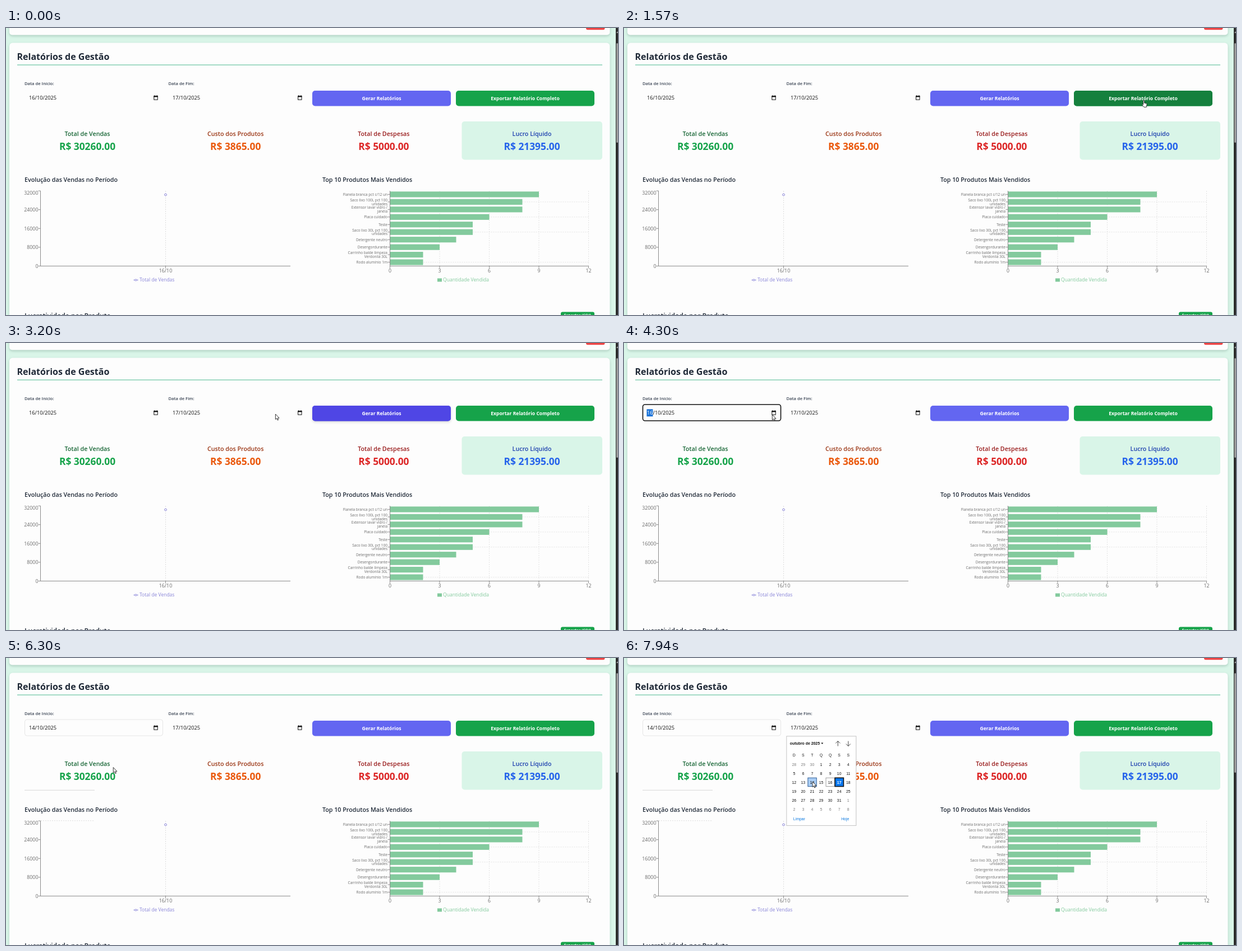
Write an HTML page that moves like this. It is 1091 px wide and 513 px high and loops after 8000 ms.

```html
<!DOCTYPE html>
<html lang="pt-BR">
<head>
<meta charset="utf-8">
<title>Relatórios de Gestão</title>
<style>
  html, body { margin: 0; width: 100%; height: 100%; overflow: hidden; background: #d9f5e8; }
  svg { display: block; width: 1091px; height: 513px; font-family: "Open Sans", "Noto Sans", sans-serif; }
  .card { fill: #fdfdfd; filter: drop-shadow(0 2px 2px rgba(20, 70, 50, .22)); }
  .cal { font-family: "Liberation Sans", Arial, sans-serif; }
</style>
</head>
<body>
<svg id="stage" viewBox="0 0 1091 513" xmlns="http://www.w3.org/2000/svg"></svg>
<script>
const NS = 'http://www.w3.org/2000/svg';
const LOOP = 8000;
const stage = document.getElementById('stage');

function el(tag, attrs, parent = stage) {
  const node = document.createElementNS(NS, tag);
  for (const k in attrs) node.setAttribute(k, attrs[k]);
  parent.appendChild(node);
  return node;
}
const rect = (x, y, width, height, fill, more = {}, parent) =>
  el('rect', { x, y, width, height, fill, ...more }, parent);
const line = (x1, y1, x2, y2, stroke, more = {}, parent) =>
  el('line', { x1, y1, x2, y2, stroke, ...more }, parent);
function text(str, x, y, size, fill, weight = 400, anchor = 'start', parent) {
  const node = el('text', { x, y, 'font-size': size, fill, 'font-weight': weight, 'text-anchor': anchor }, parent);
  node.textContent = str;
  return node;
}
const show = (node, on) => node.setAttribute('visibility', on ? 'visible' : 'hidden');

const INK = '#1f2937', AXIS = '#8c8c8c', LABEL = '#6b6b6b';
const dash = { 'stroke-dasharray': '2 2', 'stroke-width': .8 };

// Page and cards
rect(0, 0, 1091, 513, '#d9f5e8');
rect(6, -20, 1070.5, 32.5, '#fdfdfd', { rx: 5, class: 'card' });
rect(1034, -10, 33.5, 13.2, '#ef4444', { rx: 3 });
rect(6, 26.5, 1070.5, 520, '#fdfdfd', { rx: 6, class: 'card' });
rect(1087, 0, 4, 513, '#2b2b2b');
rect(1088, 27, 3, 178, '#9c9c9c', { rx: 1.5 });
el('path', { d: 'M1088 9l2-3 2 3z', fill: '#9c9c9c' });

text('Relatórios de Gestão', 19.5, 57, 16, INK, 700);
line(20, 66, 1063, 66, '#86cfb5', { 'stroke-width': 1.3 });

// Date fields
text('Data de Início:', 33, 102.3, 7.65, '#374151', 600);
text('Data de Fim:', 289.5, 102.3, 7.65, '#374151', 600);

const field = rect(33.5, 110, 246, 29, '#fdfdfd', { rx: 4 });
const daySelection = rect(40.5, 118.3, 11, 13, '#1a73d9');

function dateText(x, day) {
  const node = text('', x, 128.2, 9.25, '#111');
  const first = el('tspan', {}, node);
  first.textContent = day;
  el('tspan', {}, node).textContent = '/10/2025';
  return first;
}
const startDay = dateText(41, '16');
dateText(297, '17');

for (const x of [263.3, 520.1]) {
  rect(x + .5, 121.8, 6.4, 6.4, 'none', { stroke: '#111' });
  rect(x, 121.2, 7.4, 2.2, '#111');
  rect(x + 1, 120.3, 1, 1.5, '#111');
  rect(x + 5.4, 120.3, 1, 1.5, '#111');
}

// Buttons
function button(x, label, base, hover) {
  rect(x, 112, 247, 27.5, base, { rx: 5 });
  const over = rect(x, 112, 247, 27.5, hover, { rx: 5, opacity: 0 });
  text(label, x + 123.5, 129, 8.6, '#fff', 700, 'middle');
  return over;
}
const runHover = button(546, 'Gerar Relatórios', '#6366f1', '#4f46e5');
runHover.style.filter = 'drop-shadow(0 2px 2px rgba(0,0,0,.15))';
const exportHover = button(802, 'Exportar Relatório Completo', '#16a34a', '#15803d');

// Totals
rect(812.5, 167, 250.5, 68.5, '#d9f5e8', { rx: 5 });
[
  ['Total de Vendas', 'R$ 30260.00', '#166534', '#16a34a'],
  ['Custo dos Produtos', 'R$ 3865.00', '#9a3412', '#ea580c'],
  ['Total de Despesas', 'R$ 5000.00', '#991b1b', '#dc2626'],
  ['Lucro Líquido', 'R$ 21395.00', '#1e40af', '#2563eb']
].forEach(([name, sum, dark, bright], i) => {
  const x = 145 + i * 264.2;
  text(name, x, 193, 10.7, dark, 600, 'middle');
  text(sum, x, 218.3, 17.35, bright, 700, 'middle');
});

// Sales line chart
text('Evolução das Vendas no Período', 33, 275.2, 10.7, INK, 600);
line(284.5, 291, 284.5, 425, '#d4d4d4', dash);
line(61.5, 291, 61.5, 426, AXIS);
line(61.5, 425.5, 507, 425.5, AXIS);
line(284.5, 425.5, 284.5, 429.5, AXIS);
for (let i = 0; i < 5; i++) {
  const y = 425.5 - i * 33.6;
  line(57.5, y, 61.5, y, AXIS);
  text(i * 8000, 57.5, i === 4 ? 298.4 : y + 3.3, 8.9, LABEL, 400, 'end');
}
text('16/10', 284.5, 436.6, 8.8, LABEL, 400, 'middle');
el('circle', { cx: 284.5, cy: 298, r: 1.9, fill: '#fff', stroke: '#8884d8' });
line(227.5, 450.5, 235.5, 450.5, '#8884d8', { 'stroke-width': 1.2 });
el('circle', { cx: 231.5, cy: 450.5, r: 1.5, fill: '#fff', stroke: '#8884d8' });
text('Total de Vendas', 238, 453.3, 8.5, '#8884d8');

// Top products bar chart
text('Top 10 Produtos Mais Vendidos', 564, 275.2, 10.7, INK, 600);
const products = [
  ['Flanela branca pct c/12 un', 9], ['Saco lixo 100L pct 100|unidades', 8],
  ['Extensor lavar vidro /|janela', 8], ['Placa cuidado', 6], ['Teste', 5],
  ['Saco lixo 30L pct 100|unidades', 5], ['Detergente neutro', 4], ['Desengordurante', 3],
  ['Carrinho balde limpeza|Verdonila 30L', 2], ['Rodo alumínio 1m', 2]
];
const UNIT = 29.5, X0 = 684.5;
for (let n = 0; n <= 12; n += 3) {
  const x = X0 + n * UNIT;
  if (n) line(x, 291, x, 425, '#dcdcdc', dash);
  line(x, 425.5, x, 429.5, AXIS);
  text(n, x, 436.6, 8.8, LABEL, 400, 'middle');
}
products.forEach(([name, count], i) => {
  const y = 297.4 + i * 13.47;
  if ([1, 3, 5, 9].includes(i)) line(X0, y, 1038.5, y, '#dcdcdc', dash);
  rect(X0, y - 5.1, count * UNIT, 10.2, '#83ca9d');
  line(X0 - 4, y, X0, y, AXIS);
  const rows = name.split('|');
  rows.forEach((row, k) =>
    text(row, 680, y + 2.3 + (k - (rows.length - 1) / 2) * 6.8, 6.5, LABEL, 400, 'end'));
});
line(X0, 291, X0, 426, AXIS);
line(X0, 425.5, 1038.5, 425.5, AXIS);
rect(769, 447.5, 8, 6, '#83ca9d');
text('Quantidade Vendida', 779, 453.3, 8.6, '#83ca9d');

// Next section, cut by the lower edge
text('Lucratividade por Produto', 33, 518.6, 12.2, INK, 600);
rect(989, 507.5, 60, 18, '#16a34a', { rx: 3 });
text('Exportar (CSV)', 1019, 516, 6.8, '#fff', 700, 'middle');

// Edges left where the first calendar has been
const edges = el('g', {});
line(33, 236.3, 158, 236.3, '#dedede', { 'stroke-width': 1.2 }, edges);
line(62, 290.8, 157, 290.8, '#d4d4d4', dash, edges);

// Calendar popups
function calendar(x0, selected, today) {
  const g = el('g', { class: 'cal' });
  const put = (s, x, y, fill, weight, anchor) => text(s, x0 + x, y, 6.9, fill, weight, anchor, g);
  const cell = (i, fill, stroke, width) =>
    rect(x0 + 6.4 + (i % 7) * 16.07, 214.2 + (Math.floor(i / 7) - 2) * 16, 15.4, 15.4, fill,
      { stroke, 'stroke-width': width }, g);
  rect(x0 + .5, 139.8, 124, 159.7, '#fff', { stroke: '#c4c4c4' }, g);
  put('outubro de 2025', 6.5, 155, '#111', 700);
  el('path', { d: `M${x0 + 62} 151.6h4l-2 2.4z`, fill: '#111' }, g);
  el('path', {
    d: `M${x0 + 92} 157.5v-9m-4 4l4-4 4 4M${x0 + 110.5} 148.5v9m-4-4l4 4 4-4`,
    fill: 'none', stroke: '#333', 'stroke-width': .9
  }, g);
  const hover = cell(0, '#a9cdf5', '#2f5f98', 1);
  if (today) cell(today + 2, 'none', '#8a8a8a', .8);
  cell(selected + 2, '#0a78f0', '#111', 1.5);
  [...'DSTQQSS'].forEach((d, i) => put(d, 14 + i * 16.07, 176, '#222', 400, 'middle'));
  for (let i = 0; i < 42; i++) {
    const n = i - 2;
    const muted = n < 1 || n > 31;
    const day = n < 1 ? n + 30 : n > 31 ? n - 31 : n;
    const fill = n === selected ? '#fff' : muted ? '#7d7d7d' : '#111';
    put(day, 14 + (i % 7) * 16.07, 192.5 + Math.floor(i / 7) * 16, fill, n === selected ? 700 : 400, 'middle');
  }
  put('Limpar', 12.5, 290.2, '#0a78e0');
  put('Hoje', 112, 290.2, '#0a78e0', 400, 'end');
  return (open, px, py) => {
    show(g, open);
    const col = Math.floor((px - x0 - 6) / 16.07), row = Math.floor((py - 182) / 16);
    const inside = col >= 0 && col < 7 && row >= 0 && row < 6;
    show(hover, open && inside);
    hover.setAttribute('x', x0 + 6.4 + col * 16.07);
    hover.setAttribute('y', 182.2 + row * 16);
  };
}
const startCalendar = calendar(33, 16, 0);
const endCalendar = calendar(289.3, 17, 16);

// Pointer
const pointer = el('g', {});
const pen = { fill: '#fff', stroke: '#222', 'stroke-width': .9, 'stroke-linejoin': 'round' };
const arrow = el('path', { d: 'M0 0V9.5L2.2 7.6 3.7 11 5.2 10.3 3.8 7.1H6.7Z', ...pen }, pointer);
const hand = el('path', {
  d: 'M-1 1.2c0-1.4 2-1.4 2 0V5l3.4.8c1 .2 1.1 1 1 1.8L4.7 12.4H.2L-2.8 8.6c-.6-.9.6-1.6 1.3-.9l.5.4Z', ...pen
}, pointer);

const path = [
  [660, 1088, 498], [850, 1070, 420], [1080, 984, 86], [1180, 962, 16], [1430, 940, 130],
  [1570, 927, 129], [1780, 861, 130], [2580, 860, 130], [2800, 848, 131], [3060, 846, 131],
  [3200, 481, 127], [3500, 300, 135], [3830, 262, 132], [4300, 264.5, 128], [4400, 240, 134],
  [4640, 152, 160], [4710, 165, 158], [4850, 266, 128], [5320, 266, 128], [5820, 80, 182],
  [5960, 78, 218], [6170, 78, 218], [6450, 320, 170], [6650, 600, 128], [6760, 580, 126],
  [6850, 531.5, 125], [7120, 521, 124.5], [7500, 521, 124.5], [7940, 336, 221]
];
function pointerAt(t) {
  const i = path.findIndex(p => p[0] > t);
  if (i < 0) return path[path.length - 1].slice(1);
  if (i === 0) return path[0].slice(1);
  const [ta, xa, ya] = path[i - 1], [tb, xb, yb] = path[i];
  const k = (t - ta) / (tb - ta);
  return [xa + (xb - xa) * k, ya + (yb - ya) * k];
}

const clamp = v => Math.max(0, Math.min(1, v));
const fade = (t, from, to) => Math.min(clamp((t - from) / 80), clamp((to + 100 - t) / 100));

function draw(t) {
  const [x, y] = pointerAt(t);
  const onButton = y >= 112 && y <= 139.5 && ((x >= 546 && x <= 793) || (x >= 802 && x <= 1049));
  const seen = t >= 660;
  pointer.setAttribute('transform', `translate(${x} ${y})`);
  show(arrow, seen && !onButton);
  show(hand, seen && onButton);

  exportHover.setAttribute('opacity', fade(t, 1330, 3070));
  runHover.setAttribute('opacity', Math.max(fade(t, 3080, 3220), fade(t, 6540, 6860)));

  const focused = t >= 3980 && t < 5050;
  field.setAttribute('stroke', focused ? '#111' : t >= 5050 ? '#e6e6e6' : 'none');
  field.setAttribute('stroke-width', focused ? 1.6 : 1);
  show(daySelection, focused);
  startDay.setAttribute('fill', focused ? '#fff' : '#111');
  startDay.textContent = t >= 6170 ? '14' : '16';

  startCalendar(t >= 5050 && t < 6170, x, y);
  endCalendar(t >= 7260, x, y);
  show(edges, t >= 6170);
}

function tick() {
  draw(performance.now() % LOOP);
  requestAnimationFrame(tick);
}
tick();
</script>
</body>
</html>
```
